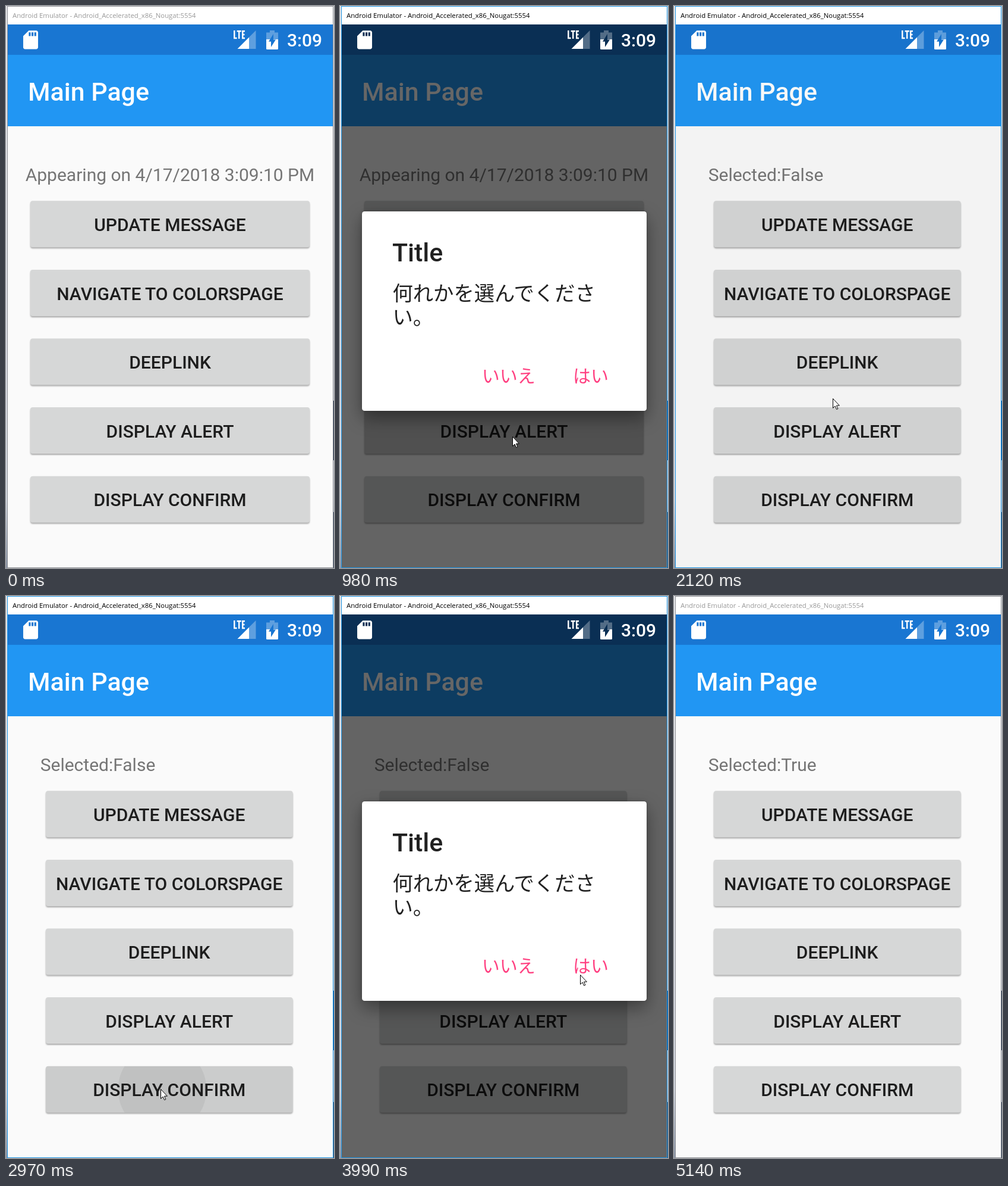
These frames come from a looping animation (552 px wide and 944 px high, 5.37 s). An HTML page:

```html
<!DOCTYPE html>
<html lang="en">
<head>
<meta charset="utf-8">
<title>Dialog demo</title>
<style>
html, body { margin: 0; width: 100%; height: 100%; overflow: hidden; background: #fff; }
svg { display: block; width: 552px; height: 944px; }
text { font-family: Roboto, sans-serif; white-space: pre; }
.caption { font: 11.33px "Open Sans", sans-serif; }
.medium { font-weight: 500; }
.ja { font-family: "Noto Sans CJK JP", "Noto Sans CJK", sans-serif; }
.btn { filter: drop-shadow(0 2px 1.3px rgba(0,0,0,.32)); }
.card { filter: drop-shadow(0 12px 15px rgba(0,0,0,.34)) drop-shadow(0 0 3px rgba(0,0,0,.2)); }
</style>
</head>
<body>
<svg id="stage" viewBox="0 0 552 944" xmlns="http://www.w3.org/2000/svg">
  <defs>
    <linearGradient id="edge" x1="0" y1="0" x2="0" y2="1">
      <stop offset="0" stop-color="#e6e7ea"/>
      <stop offset=".6" stop-color="#dcdee6"/>
      <stop offset=".88" stop-color="#d3d7e0"/>
      <stop offset="1" stop-color="#8d97a8"/>
    </linearGradient>
    <mask id="bolt">
      <rect x="430" y="35" width="40" height="45" fill="#fff"/>
      <path d="M446 69V59.7H442L450 47V56.5H454Z" fill="#000"/>
    </mask>
    <clipPath id="clip"><rect id="clipBox" height="78" rx="4"/></clipPath>
  </defs>

  <rect width="552" height="944" fill="url(#edge)"/>
  <rect id="side" x="551" y="663" width="1" height="100"/>
  <rect x="551" y="850" width="1" height="94" fill="#3c4a60"/>
  <rect id="frame" x="2.5" y=".5" width="548" height="943" fill="#fff"/>
  <text id="caption" class="caption" x="11" y="20">Android Emulator - Android_Accelerated_x86_Nougat:5554</text>

  <rect x="3" y="31" width="547" height="912" fill="#fafafa"/>
  <rect x="3" y="82" width="547" height="120" fill="#2196f3"/>
  <rect x="3" y="31" width="547" height="51" fill="#1976d2"/>
  <text class="medium" x="37" y="158.5" font-size="42.86" fill="#fff">Main Page</text>
  <text id="label" y="294" font-size="30" fill="#757575"></text>
  <g id="boxes"></g>
  <g id="ripple" clip-path="url(#clip)">
    <rect x="3" y="31" width="547" height="912" fill-opacity=".05"/>
    <circle id="wave" fill-opacity=".055"/>
  </g>
  <g id="names" class="medium" font-size="30" fill="#1d1d1d" text-anchor="middle"></g>

  <rect id="dim" x="3" y="31" width="547" height="912"/>

  <g fill="#fff">
    <path transform="translate(22.7 38) scale(1.5625)" fill-rule="evenodd"
      d="M18 2h-8L4 8v12c0 1.1.9 2 2 2h12c1.1 0 2-.9 2-2V4c0-1.1-.9-2-2-2zM12 8h-2V4h2zM15 8h-2V4h2zM18 8h-2V4h2z"/>
    <path d="M384.3 41V54H388.6M388.6 42.2H395.8M392.2 42V55M402 42.2H398.2V54H402M398 48H401.5"
      fill="none" stroke="#fff" stroke-width="2.4"/>
    <path d="M409 52.4L420.5 41V72H409Z" fill-opacity=".3"/>
    <path d="M389.5 72L409 52.4V72Z"/>
    <g mask="url(#bolt)">
      <path d="M444 41H452V44.5H458V56H438V44.5H444Z" fill-opacity=".3"/>
      <path d="M438 56H458V71.5Q458 73 456.5 73H439.5Q438 73 438 71.5Z"/>
    </g>
    <text class="medium" x="473" y="68" font-size="30">3:09</text>
  </g>

  <g id="dialog">
    <rect class="card" x="37" y="345" width="479" height="335" rx="4.3" fill="#fff"/>
    <text class="medium" x="88" y="428.5" font-size="42.86" fill="#212121">Title</text>
    <g lang="ja" fill="#212121" font-size="34.3">
      <text class="ja" x="88.5" y="494.5">何れかを選んでくださ</text>
      <text class="ja" x="88.5" y="534.7">い。</text>
    </g>
    <g lang="ja" fill="#ff4081" font-size="30">
      <text class="ja" x="238.7" y="631.5">いいえ</text>
      <text class="ja" x="392" y="631.5">はい</text>
    </g>
  </g>

  <path id="cursor" d="M.5 .5V16.3L4.1 13 6.6 18.5 8.9 17.5 6.5 12.1H11.4Z" fill="#fff" stroke="#000"/>
</svg>
<script>
(() => {
  const LOOP = 5370;
  const $ = id => document.getElementById(id);
  const set = (el, attrs) => { for (const k in attrs) el.setAttribute(k, attrs[k]); };
  const clamp = v => Math.min(1, Math.max(0, v));
  const ramp = (t, a, b) => clamp((t - a) / (b - a));

  const ticks = [0, 70, 140, 210, 290, 360, 430,
    810, 890, 980, 1040, 1120, 1200, 1270, 1350, 1420, 1490,
    1890, 1960, 2040, 2120, 2200, 2270, 2350, 2420, 2500, 2580, 2670,
    2970, 3060, 3130, 3210, 3290, 3360, 3440, 3520, 3610,
    3990, 4070, 4160, 4220, 4300, 4370, 4450, 4530, 5140];

  // Pointer path: time, x, y
  const track = [[70, 372, 905], [430, 290, 723], [1040, 290, 723], [1270, 232, 592],
    [1490, 270, 622], [2040, 270, 622], [2420, 256, 798], [2670, 260, 828],
    [3130, 260, 828], [3440, 405, 667], [3610, 404, 636], [4220, 404, 636], [4450, 389, 874]];

  const rounds = [
    { open: 810, close: 1890, button: 3, x: 290 },
    { open: 2970, close: 3990, button: 4, x: 263 }
  ];

  const titles = ["UPDATE MESSAGE", "NAVIGATE TO COLORSPAGE", "DEEPLINK", "DISPLAY ALERT", "DISPLAY CONFIRM"];
  const rowY = i => 327.3 + i * 115.6;

  function add(parent, tag, attrs) {
    const el = document.createElementNS("http://www.w3.org/2000/svg", tag);
    set(el, attrs);
    return parent.appendChild(el);
  }

  const boxes = titles.map((s, i) =>
    add($("boxes"), "rect", { class: "btn", y: rowY(i), height: 78, rx: 4, fill: "#d6d7d7" }));
  const names = titles.map((s, i) => {
    const el = add($("names"), "text", { y: rowY(i) + 50.7 });
    el.textContent = s;
    return el;
  });

  function pointer(t) {
    let i = 0;
    while (i < track.length - 2 && track[i + 1][0] <= t) i++;
    const [a, ax, ay] = track[i], [b, bx, by] = track[i + 1];
    const k = ramp(t, a, b);
    return [Math.round(ax + (bx - ax) * k), Math.round(ay + (by - ay) * k)];
  }

  function drawRipple(t, x, width) {
    const hit = rounds.find(r => t >= r.open && t < r.open + 300);
    set($("ripple"), { visibility: hit ? "visible" : "hidden" });
    if (!hit) return;
    const age = t - hit.open, y = rowY(hit.button);
    set($("clipBox"), { x, y, width });
    set($("wave"), { cx: hit.x, cy: y + 39, r: 74.5 + age * 1.3 });
    set($("ripple"), { opacity: 1 - ramp(age, 100, 300) });
  }

  function draw(time) {
    const t = ticks.filter(v => v <= time).pop();
    const active = t >= 70 && t < 5140;
    set($("frame"), { stroke: active ? "#1b93e3" : "#8b8d92" });
    set($("caption"), { fill: active ? "#000" : "#999" });
    set($("side"), { fill: active ? "#0a559c" : "#27364f" });

    const wide = t < 1930;
    const x = wide ? 41 : 67, width = wide ? 470 : 415.5;
    boxes.forEach(b => set(b, { x, width }));
    names.forEach(n => set(n, { x: wide ? 276 : 274.7 }));
    $("label").textContent = wide ? "Appearing on 4/17/2018 3:09:10 PM" : "Selected:" + (t < 4030 ? "False" : "True");
    set($("label"), { x: wide ? 32.7 : 57.7 });
    drawRipple(t, x, width);

    let dim = 0, alpha = 0;
    for (const { open, close } of rounds) {
      if (t < open) continue;
      const shown = ramp(t, open + 40, open + 170);
      dim = .6 * shown * (1 - ramp(t, close + 16, close + 241));
      alpha = shown * (1 - ramp(t, close + 10, close + 95));
    }
    set($("dim"), { "fill-opacity": dim });
    set($("dialog"), { opacity: alpha, visibility: alpha > 0 ? "visible" : "hidden" });

    set($("cursor"), {
      transform: `translate(${pointer(t)})`,
      visibility: t >= 70 && t < 4530 ? "visible" : "hidden"
    });
  }

  const start = performance.now();
  function loop() {
    draw((performance.now() - start) % LOOP);
    requestAnimationFrame(loop);
  }
  loop();
})();
</script>
</body>
</html>
```
